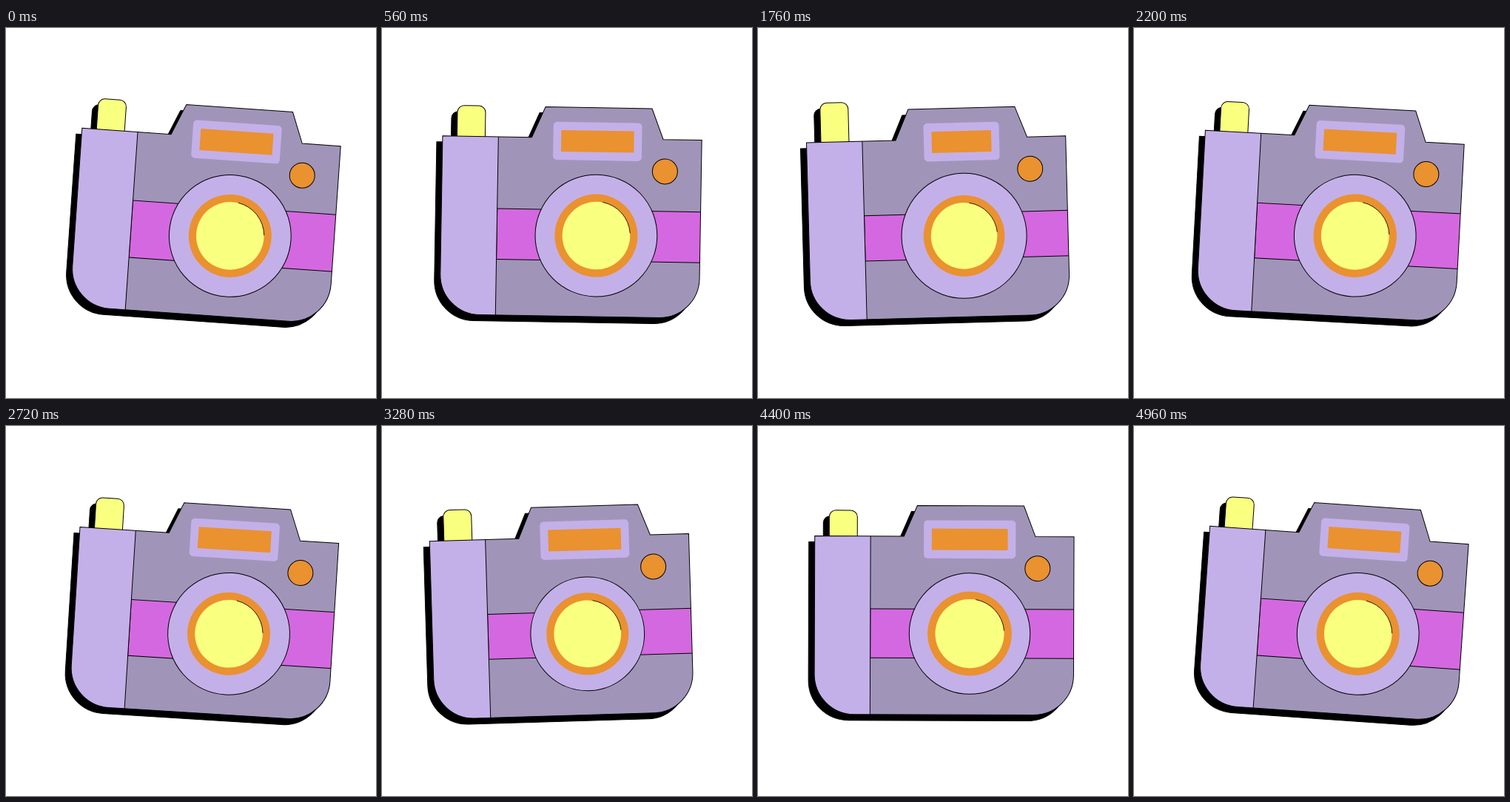
Recreate the animation shown at these times as an HTML page. Size 500 px wide and 500 px high, loop 5000 ms.

```html
<!DOCTYPE html>
<html lang="en">
<head>
<meta charset="utf-8">
<title>Camera</title>
<style>
  html, body { margin: 0; width: 100%; height: 100%; overflow: hidden; background: #fff; }
  svg { display: block; width: 100%; height: 100%; }
  .line { stroke: #000; stroke-width: 1; }
  .body { fill: #a095b9; }
  .light { fill: #c4b0e8; }
  .pink { fill: #d468e0; }
  .orange { fill: #ea9130; }
  .yellow { fill: #f9ff7e; }
</style>
</head>
<body>
<svg viewBox="0 0 500 500">
  <defs>
    <path id="shell" d="M75.5 149.3H196L214 107.8H358L373.7 149.3H425.8V336.2A54 54 0 0 1 371.8 390.2H129.5A54 54 0 0 1 75.5 336.2Z"/>
    <clipPath id="inside"><use href="#shell"/></clipPath>
  </defs>
  <g transform="translate(-8 8)">
    <g class="tilt line">
      <rect class="key" x="95" width="38" rx="9"/>
      <use href="#shell"/>
    </g>
  </g>
  <g class="tilt">
    <rect class="key yellow line" x="95" width="38" rx="9"/>
    <use href="#shell" class="body"/>
    <g clip-path="url(#inside)">
      <rect id="band" class="pink line" x="150.9" width="290"/>
      <rect class="light line" x="60" y="140" width="90.9" height="260"/>
    </g>
    <use href="#shell" class="line" fill="none"/>
    <rect id="frame" class="light" y="127.6" height="51.4" rx="5"/>
    <rect id="window" class="orange" y="138.8" height="29"/>
    <circle class="orange line" cx="376.7" cy="192.4" r="17"/>
    <circle id="lens" class="light line" cx="285.2" cy="280.6"/>
    <g id="glass">
      <circle class="orange" r="56"/>
      <circle class="yellow" r="45.8"/>
      <path d="M8 -45.3A46 46 0 0 1 45.8 -4" fill="none" stroke="#000" stroke-width=".8"/>
    </g>
  </g>
</svg>
<script>
const CYCLE = 2500, HALF = CYCLE / 2, LAG = 12;
const PIVOT = "290 533";
const $ = id => document.getElementById(id);
const all = q => [...document.querySelectorAll(q)];
const tilts = all(".tilt"), keys = all(".key");
const mix = (a, b, k) => a + (b - a) * k;
const clamp = x => Math.min(1, Math.max(0, x));

function set(el, attrs) {
  for (const name in attrs) el.setAttribute(name, attrs[name]);
}

function easeInOut(x, power) {
  return x < .5 ? .5 * (2 * x) ** power : 1 - .5 * (2 - 2 * x) ** power;
}

function elasticOut(x) {
  const amp = 2.25, period = .3;
  if (x <= 0) return 0;
  if (x >= 1) return 1;
  const shift = period / (2 * Math.PI) * Math.asin(1 / amp);
  return 1 + amp * 2 ** (-10 * x) * Math.sin((x - shift) * 2 * Math.PI / period);
}

// 0 = full size, 1 = pressed in; parts follow each other in turn
function press(t, order) {
  const delay = order * 91;
  return easeInOut(clamp((t - 640 - delay) / 320), 2)
    - elasticOut((t - 1338 - delay) / 1100);
}

// 0 = leaning right, 1 = leaning left
function swing(t) {
  const u = (t - LAG + CYCLE) % CYCLE / HALF;
  return easeInOut(u < 1 ? u : 2 - u, 2.1);
}

function centered(el, width) {
  set(el, { x: 285 - width / 2, width });
}

function draw(ms) {
  const t = ms % CYCLE;
  const lean = swing(t);
  const angle = mix(4, -4, lean);
  tilts.forEach(el => set(el, { transform: `rotate(${angle} ${PIVOT})` }));

  const band = mix(77.2, 54.2, lean);
  set($("band"), { y: 280.6 - band / 2, height: band });

  set($("lens"), { r: mix(82.4, 68.2, press(t, 0)) });
  set($("glass"), {
    transform: `translate(285.2 280.6) scale(${mix(1, .818, press(t, 1))})`
  });

  const cut = 43.3 * press(t, 2);
  centered($("frame"), 119.8 - cut);
  centered($("window"), 98.4 - cut);

  const rise = mix(41.5, 22, press(t, 3));
  keys.forEach(el => set(el, { y: 149.3 - rise, height: rise + 12 }));
}

const start = performance.now();
function tick() {
  draw(performance.now() - start);
  requestAnimationFrame(tick);
}
tick();
</script>
</body>
</html>
```
